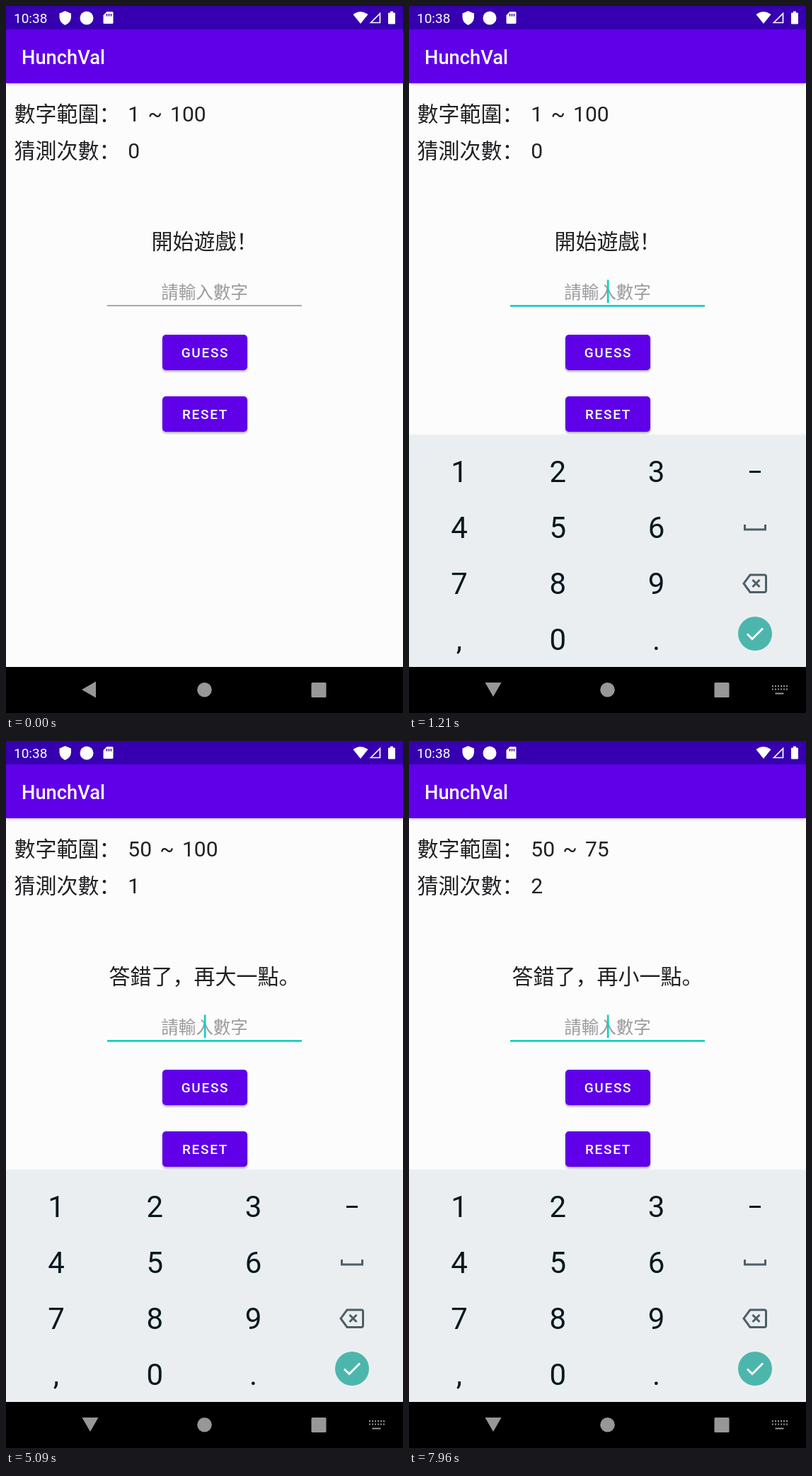
An HTML page that plays this animation: 561 by 998 pixels, repeating every 8 s.

```html
<!DOCTYPE html>
<html lang="zh">
<head>
<meta charset="utf-8">
<title>Guessing game</title>
<style>
  html, body { margin: 0; width: 100%; height: 100%; overflow: hidden; background: #fcfcfd; }
  svg { display: block; width: 100vw; height: 100vh; }
  text { font-family: Roboto, 'Noto Sans CJK SC', 'Noto Sans CJK', sans-serif; white-space: pre; }
  .body { font-size: 30px; fill: #212124; word-spacing: 3.8px; }
  .field { font-size: 24.5px; fill: #212124; }
  .mid { text-anchor: middle; }
  .button rect { fill: #5f00e9; filter: drop-shadow(0 2px 1.5px #0005); }
  .button text { font-size: 19px; font-weight: 500; letter-spacing: 1.7px; fill: #fff; }
  .key { font-size: 42px; fill: #07191f; text-anchor: middle; }
  .line { fill: none; stroke: #4c5f67; stroke-width: 3; }
</style>
</head>
<body>
<svg viewBox="0 0 561 998" preserveAspectRatio="none">
  <defs>
    <clipPath id="guessClip"><rect x="221" y="464" width="120" height="50" rx="5"/></clipPath>
    <clipPath id="screenClip"><rect width="561" height="933"/></clipPath>
  </defs>
  <rect width="561" height="998" fill="#fcfcfd"/>
  <rect y="33" width="561" height="76" fill="#5f00e9" style="filter:drop-shadow(0 1px 2px #0004)"/>
  <rect width="561" height="33" fill="#3600b0"/>
  <text x="22" y="81.5" font-size="27.3" font-weight="500" fill="#fff">HunchVal</text>

  <g fill="#fff">
    <text x="11" y="24" font-size="19">10:38</text>
    <path d="M83.500 7L92 10.500V16Q91.500 23.500 83.500 27Q76 23.500 75.500 16V10.500Z"/>
    <circle cx="114" cy="17" r="9.500"/>
    <path d="M142.500 8H150Q151.500 8 151.500 9.500V23.500Q151.500 25 150 25H139Q137.500 25 137.500 23.500V13Z"/>
    <path d="M142.500 11v3.500M145.500 11v3.500M148.500 11v3.500" stroke="#3600b0" stroke-width="1.500"/>
    <path d="M490.500 12Q501 4 511.500 12L501 25Z"/>
    <path d="M515.500 23.500L528.500 10.500V23.500Z" fill="none" stroke="#fff" stroke-width="1.700"/>
    <path d="M543 7.500h4v2h2q1 0 1 1v14q0 1-1 1h-8q-1 0-1-1v-14q0-1 1-1h2Z"/>
  </g>

  <text class="body" x="11.5" y="163">數字範圍：</text>
  <text class="body" x="11.5" y="215">猜測次數：</text>
  <text class="body" id="range" x="172.3" y="163"></text>
  <text class="body" id="count" x="172.3" y="215"></text>
  <text class="body mid" id="message" x="280.5" y="342.500"></text>

  <text class="field mid" id="value" x="280.5" y="412.500"></text>
  <rect id="underline" x="143" width="275"/>
  <rect id="cursor" y="386.500" width="2.700" height="32.500" fill="#12cfc0"/>

  <g class="button">
    <rect x="221" y="464" width="120" height="50" rx="5"/>
    <circle id="ripple" cx="290" cy="490" fill="#fff" clip-path="url(#guessClip)"/>
    <text class="mid" x="281.500" y="496">GUESS</text>
  </g>
  <g class="button">
    <rect x="221" y="551" width="120" height="50" rx="5"/>
    <text class="mid" x="281.500" y="583">RESET</text>
  </g>

  <g clip-path="url(#screenClip)">
    <g id="keyboard">
      <rect y="606" width="561" height="327" fill="#ebeef0" style="filter:drop-shadow(0 -1px 1px #0001)"/>
      <g id="keys"></g>
      <path d="M481 657.500h16" class="line" style="stroke:#07191f"/>
      <path d="M474.500 732v7h29v-7" class="line"/>
      <path d="M482 803H502Q504.500 803 504.500 805.500V825Q504.500 827.500 502 827.500H482L473 815.200Z" class="line"/>
      <path d="M485.500 810l10 10m0-10l-10 10" class="line"/>
      <circle cx="489" cy="886" r="24" fill="#4db6ac"/>
      <path d="M478 886.500l7 7l15-15" fill="none" stroke="#fff" stroke-width="3"/>
    </g>
  </g>

  <rect y="933" width="561" height="65" fill="#000"/>
  <g fill="#979797">
    <path id="back" d="M107 965L127 953.500V976.500Z"/>
    <circle cx="280.500" cy="965.300" r="10.300"/>
    <rect x="431.500" y="955" width="21" height="21" rx="1.500"/>
    <g id="imeIcon" fill="none" stroke="#979797" stroke-width="2">
      <path d="M513 960h22M513 964.500h22" stroke-dasharray="2 2"/>
      <path d="M517.500 970.500h12"/>
    </g>
  </g>

  <circle id="touch" r="15.500" fill="#fff" fill-opacity=".75" stroke="#b9bbcb" stroke-opacity=".8" stroke-width="2.500"/>
</svg>
<script>
const LOOP = 8000, FOCUS = 720, TEAL = '#12cfc0';
const $ = id => document.getElementById(id);
const clamp = x => Math.max(0, Math.min(1, x));
const set = (id, attrs) => Object.entries(attrs).forEach(([k, v]) => $(id).setAttribute(k, v));

// Each tap changes the app state when the finger lifts.
const taps = [
  { up: FOCUS, x: 319, y: 397, state: {} },
  { up: 2430, x: 205, y: 738, state: { value: '5' } },
  { up: 3000, x: 207, y: 893, state: { value: '50' } },
  { up: 3650, x: 290, y: 490, guess: true,
    state: { value: '', range: '50 ~ 100', count: 1, message: '答錯了，再大一點。' } },
  { up: 6090, x: 56, y: 812, state: { value: '7' } },
  { up: 6600, x: 205, y: 738, state: { value: '75' } },
  { up: 7500, x: 290, y: 490, guess: true,
    state: { value: '', range: '50 ~ 75', count: 2, message: '答錯了，再小一點。' } }
];
const HOLD = 130, FADE = 90;

['123', '456', '789', ',0.'].forEach((row, r) => [...row].forEach((label, c) => {
  const key = document.createElementNS('http://www.w3.org/2000/svg', 'text');
  key.setAttribute('class', 'key');
  key.setAttribute('x', 71 + c * 139.3);
  key.setAttribute('y', 672 + r * 79);
  key.textContent = label;
  $('keys').append(key);
}));

function draw(t) {
  const done = taps.filter(tap => tap.up <= t);
  const state = Object.assign(
    { value: '', range: '1 ~ 100', count: 0, message: '開始遊戲！' },
    ...done.map(tap => tap.state));
  for (const id of ['range', 'count', 'message']) $(id).textContent = state[id];

  const focused = t >= FOCUS;
  $('value').textContent = state.value || '請輸入數字';
  $('value').style.fill = state.value ? '#212124' : '#9b9b9e';
  set('underline', focused ? { y: 422, height: 2.7, fill: TEAL } : { y: 422.3, height: 1.3, fill: '#86787a' });

  const sinceEdit = focused ? t - done[done.length - 1].up : 0;
  const cursorOn = focused && sinceEdit % 1000 < 500;
  const halfWidth = state.value.length * 24.5 * 0.5615 / 2;
  set('cursor', { x: 279.8 + halfWidth, opacity: +cursorOn });

  const open = 1 - (1 - clamp((t - 850) / 240)) ** 3;
  set('keyboard', { transform: `translate(0 ${330 * (1 - open)})`, opacity: open ? 1 : 0 });
  set('imeIcon', { opacity: +focused });
  set('back', { transform: `rotate(${-90 * open} 118 ${965 - open})` });

  const tap = taps.find(p => t >= p.up - HOLD && t < p.up + FADE);
  set('touch', tap
    ? { cx: tap.x, cy: tap.y, opacity: 1 - clamp((t - tap.up) / FADE) }
    : { opacity: 0 });

  const press = taps.find(p => p.guess && t >= p.up - HOLD && t < p.up + 250);
  set('ripple', press
    ? { r: 20 + 70 * clamp((t - press.up + HOLD) / 250), opacity: 0.24 * (1 - clamp((t - press.up) / 250)) }
    : { r: 0, opacity: 0 });
}

function tick() {
  draw(performance.now() % LOOP);
  requestAnimationFrame(tick);
}
tick();
</script>
</body>
</html>
```
